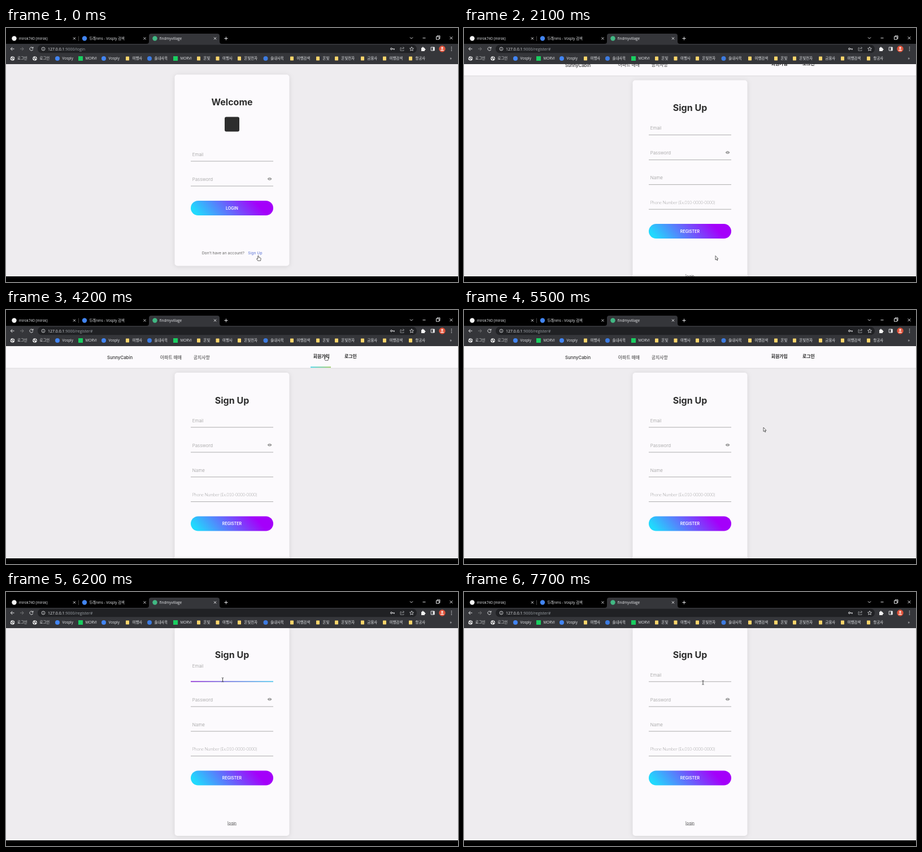
An HTML page that plays this animation: 800x450 px, repeating every 8000 ms.

```html
<!DOCTYPE html>
<html lang="ko">
<head>
<meta charset="utf-8">
<title>Sign Up</title>
<style>
html, body { margin: 0; width: 100%; height: 100%; overflow: hidden; background: #000; }
svg { display: block; }
text { font-family: Inter, "Noto Sans CJK KR", "Noto Sans CJK", sans-serif; white-space: pre; }
.ui { font-family: "Open Sans", "Noto Sans CJK KR", "Noto Sans CJK", sans-serif; }
.lato { font-family: Lato, sans-serif; }
.card { fill: #fcfafd; filter: drop-shadow(0 1px 4px rgba(0, 0, 0, .1)); }
.icon { fill: none; stroke: #e4e5e7; stroke-width: 1; }
</style>
</head>
<body>
<svg id="stage" width="800" height="450" viewBox="0 0 800 450">
  <defs>
    <clipPath id="view"><path d="M0 64H800V440H0Z"/></clipPath>
    <linearGradient id="pill" gradientUnits="userSpaceOnUse" x1="30" y1="45" x2="100" y2="-15">
      <stop stop-color="#21d9fd"/><stop offset="1" stop-color="#a400fa"/>
    </linearGradient>
    <linearGradient id="focus"><stop stop-color="#8a1fd8"/><stop offset="1" stop-color="#43c8f4"/></linearGradient>
    <linearGradient id="hover"><stop stop-color="#2fd0e4"/><stop offset="1" stop-color="#8cc34a"/></linearGradient>
  </defs>
  <g clip-path="url(#view)">
    <path d="M0 64H800V440H0Z" fill="#eeecef"/>
    <g id="login"></g>
    <g id="register"></g>
  </g>
  <g id="chrome"></g>
  <g id="cursor">
    <path id="arrow" d="M0 0V7.3L1.7 5.8 2.8 8.3 4 7.8 2.9 5.4H5Z" fill="#fff" stroke="#222" stroke-width=".7"/>
    <path id="hand" d="M-.8 .8Q0-.4.8.8V3.4L3.9 4.2Q4.8 4.6 4.6 6L4 9.3H-.9L-3 5.9Q-2.6 4.6-.8 6Z" fill="#fff" stroke="#222" stroke-width=".7"/>
    <path id="beam" d="M-1.7-3.5H-.5L0-3 .5-3.5H1.7M0-3V3M-1.7 3.5H-.5L0 3 .5 3.5H1.7" fill="none" stroke="#333" stroke-width=".9"/>
  </g>
</svg>
<script>
const $ = id => document.getElementById(id);
const text = (x, y, s, size, fill, more = '') =>
  `<text x="${x}" y="${y + size * .36}" font-size="${size}" fill="${fill}" ${more}>${s}</text>`;
const mid = 'text-anchor="middle" ';
const rect = (x, y, w, h, fill, r = 0) => `<rect x="${x}" y="${y}" width="${w}" height="${h}" rx="${r}" fill="${fill}"/>`;
const circle = (x, y, r, fill) => `<circle cx="${x}" cy="${y}" r="${r}" fill="${fill}"/>`;
const icon = (d, more = '') => `<path class="icon" d="${d}" ${more}/>`;

// Page content
const card = (y, h) => `<rect class="card" x="298.5" y="${y}" width="203" height="${h}" rx="5"/>`;
const title = (y, s) => text(400, y, s, 16, '#2d2d2d', mid + 'font-weight="700"');
const eye = y => `<path d="M462.8 ${y}Q466.6 ${y - 5} 470.4 ${y}Q466.6 ${y + 5} 462.8 ${y}Z" fill="#858585"/>` +
  circle(466.6, y, 1.7, '#fcfafd') + circle(466.6, y, 1, '#858585');
const field = (y, label, size = 8, more = '') =>
  text(329.7, y, label, size, '#999', 'font-weight="300" ' + more) + rect(327, y + 11.5, 146, 1, '#adadad');
const button = (y, label) => `<g transform="translate(327 ${y})">` + rect(0, 0, 146, 26, 'url(#pill)', 13) +
  text(73, 13, label, 7.1, '#fff', mid + 'font-weight="600"') + '</g>';

$('login').innerHTML = card(82.5, 339) + title(131, 'Welcome') + rect(387, 157.5, 26, 26, '#2d2d2d', 3) +
  field(224, 'Email') + field(268, 'Password') + eye(267.3) + button(306, 'LOGIN') +
  text(346.7, 398.5, 'Don’t have an account?', 6.8, '#666') +
  text(428.3, 398.5, 'Sign Up', 6.8, '#5b74d6');

const navItem = (x, s) => text(x, 82, s, 7.9, '#222', 'font-weight="700"');
$('register').innerHTML = rect(0, 102.5, 800, 1.5, '#e2e0e3') + rect(0, 64, 800, 38.5, '#fcfafd') +
  text(179, 84.5, 'SunnyCabin', 7.8, '#333', 'font-weight="500"') +
  text(272.7, 84, '아파트 매매', 7.9, '#333', 'font-weight="500"') +
  text(331.7, 84, '공지사항', 7.9, '#333', 'font-weight="500"') +
  navItem(543.8, '회원가입') + navItem(599, '로그인') +
  '<rect id="join" x="539" y="100.5" height="1.6" fill="url(#hover)"/>' +
  '<rect id="enter" x="594" y="100.5" height="1.6" fill="url(#hover)"/>' +
  card(111, 370) + title(160, 'Sign Up') +
  '<g id="email">' + text(329.7, 196, 'Email', 8, '#999', 'font-weight="300"') + '</g>' +
  rect(327, 207.3, 146, 1, '#adadad') + '<rect id="line" x="327" y="206.8" height="1.5" fill="url(#focus)"/>' +
  field(240, 'Password') + eye(239) + field(283.8, 'Name') +
  field(327.6, 'Phone Number (Ex.010-0000-0000)', 7.3, 'class="lato"') + button(365.5, 'REGISTER') +
  text(400, 458, 'login', 7, '#555', mid + 'text-decoration="underline"');

// Browser frame
const ui = (x, y, s, size = 6.4, fill = '#e8eaed', more = '') => text(x, y, s, size, fill, 'class="ui" ' + more);
const cross = (x, y, r) => icon(`M${x - r} ${y - r}L${x + r} ${y + r}M${x + r} ${y - r}L${x - r} ${y + r}`);
const marks = {
  globe: x => circle(x, 54, 3.8, '#f1f1f1') + `<path d="M${x - 3} 53L${x - 1} 54 ${x - .5} 57M${x + 1} 51L${x + .5} 53 ${x + 3} 54.5" fill="none" stroke="#35363a" stroke-width="1.1"/>`,
  search: x => circle(x, 54, 4, '#4285f4'),
  portal: x => rect(x - 4, 50, 8, 8, '#19ce60'),
  office: x => circle(x, 54, 4, '#3d7be0'),
  folder: x => rect(x - 3, 50.5, 6, 7, '#fbd56b', .7)
};
const bookmarks = [
  ['globe', 11.5, '로그인'], ['globe', 51, '로그인'], ['search', 91, 'Vosply'], ['portal', 132, 'MORVI'],
  ['search', 173, 'Vosply'], ['folder', 215, '여행사'], ['office', 254, '솔내사옥'], ['portal', 300, 'MORVI'],
  ['folder', 341, '온빛'], ['folder', 374.5, '여행사'], ['folder', 413, '온빛전자'], ['office', 459.5, '솔내사옥'],
  ['folder', 506, '여행검색'], ['folder', 552, '온빛'], ['folder', 585, '온빛전자'], ['folder', 631, '금융사'],
  ['folder', 670, '여행검색'], ['folder', 716, '항공사']
];
const tabs = [[10, 'mirok740 (mirok)', '#f5f5f5'], [134.5, '두레nms - Vosply 검색', '#4285f4'], [259, 'findmyvillage', '#41b883']];

$('chrome').innerHTML = rect(0, 0, 800, 28, '#000') + rect(0, 28, 800, 36, '#35363a') + rect(0, 440, 800, 10, '#000') +
  '<path d="M249 28Q253 28 253 24V14Q253 10 257 10H374Q378 10 378 14V24Q378 28 382 28Z" fill="#35363a"/>' +
  tabs.map(([x, s, c]) => circle(x + 4.5, 18.5, 4.2, c) + ui(x + 12.7, 18.5, s) + cross(x + 111, 18.5, 2)).join('') +
  icon('M128.5 14.5V23', 'style="stroke:#444"') + icon('M386.5 18.5H392.5M389.5 15.5V21.5') +
  icon('M715 16.5L717.5 19 720 16.5M737.5 17.8H742.5M761.5 15.3H766.5V20.3H761.5ZM763 15V13.8H768V18.8H767') + cross(788, 17.7, 2.4) +
  rect(56, 29.7, 671, 14.6, '#202124', 7.3) +
  icon('M14.5 37H8.5M11.3 34L8.3 37 11.3 40') +
  icon('M25 37H31M28.2 34L31.2 37 28.2 40', 'style="stroke:#77787b"') +
  icon('M47 34.8A3 3 0 1 0 47.8 38M48 33.5V36H45.5') +
  icon('M69 37A3 3 0 1 1 63 37A3 3 0 1 1 69 37M66 36.6V38.8M66 35V35.8', 'style="stroke-width:.8"') +
  ui(74, 37, '127.0.0.1<tspan id="path" fill="#9aa0a6"></tspan>', 7) +
  icon('M683.6 37A1.5 1.5 0 1 1 680.6 37A1.5 1.5 0 1 1 683.6 37H688M686.8 37V39') +
  icon('M700 35H698V40.2H704V38.5M699.8 38Q700.3 35.3 704.5 35.3M702.5 33.3L704.7 35.3 702.5 37.2', 'style="stroke:#a5a7aa;stroke-width:.8"') +
  icon('M718 33.5L719 35.9 721.5 36.1 719.6 37.8 720.2 40.3 718 39 715.8 40.3 716.4 37.8 714.5 36.1 717 35.9Z', 'style="stroke-width:.8"') +
  rect(735, 35, 6, 6, '#f1f1f1', .6) + circle(737.8, 34.8, 1.3, '#f1f1f1') + circle(741.2, 38, 1.3, '#f1f1f1') +
  icon('M752.2 34H758.2V40H752.2Z') + rect(755.5, 34, 3, 6, '#e4e5e7') +
  circle(772, 37, 5.7, '#e0523a') + circle(772, 35.4, 1.8, '#fbe4dd') + '<path d="M768.4 40.2Q772 35.6 775.6 40.2Z" fill="#fbe4dd"/>' +
  [34, 37, 40].map(y => circle(788.5, y, .8, '#e4e5e7')).join('') +
  bookmarks.map(([kind, x, s]) => marks[kind](x) + ui(x + 8.6, 54, s, 6.4)).join('') + ui(785.5, 53.5, '»', 7);

// Motion
const pointer = [
  [0, 446.5, 403], [1990, 446.5, 403], [2000, 445, 403.5], [2200, 445, 403.5], [2800, 577, 102], [3100, 640, 88],
  [3500, 610, 80], [3800, 610, 80], [4100, 566, 80], [4500, 566, 80], [4700, 604, 92], [5100, 565, 150],
  [5500, 530, 208], [5800, 383.5, 155.5], [6500, 383.5, 155.5], [7000, 538, 200], [7300, 538, 200],
  [7700, 423, 160.5], [8000, 423, 160.5]
];
const scroll = [[0, 39], [2000, 39], [2100, 18.4], [2200, 5], [2300, 0], [5550, 0], [5700, 36], [5800, 49], [8000, 49]];
const ease = u => u * u * (3 - 2 * u);
const ramp = (t, a, b) => ease(Math.min(1, Math.max(0, (t - a) / (b - a))));
const at = (keys, t) => {
  const i = Math.max(1, keys.findIndex(k => k[0] > t)), a = keys[i - 1], b = keys[i];
  const u = ease((t - a[0]) / (b[0] - a[0]));
  return a.slice(1).map((v, j) => v + (b[j + 1] - v) * u);
};
const show = (id, on) => $(id).setAttribute('display', on ? 'inline' : 'none');

function draw(now) {
  const t = Math.floor(now % 8000 / 100) * 100;
  const signup = t >= 2000, [x, y] = at(pointer, t);
  show('login', !signup);
  show('register', signup);
  $('path').textContent = signup ? ':9000/register#' : ':9000/login';
  $('register').setAttribute('transform', `translate(0 ${-at(scroll, t)[0]})`);

  const focus = ramp(t, 5800, 6100) - ramp(t, 7000, 7300);
  $('email').setAttribute('transform', `translate(0 ${-16 * focus})`);
  $('line').setAttribute('width', 146 * focus);
  $('join').setAttribute('width', 36 * (ramp(t, 3900, 4200) - ramp(t, 4500, 4800)));
  $('enter').setAttribute('width', 32 * (ramp(t, 3200, 3500) - ramp(t, 3800, 4100)));

  const onNav = y < 95 && (x > 539 && x < 575 || x > 594 && x < 626);
  const hand = !signup || onNav, beam = t > 5600 && x > 327 && x < 473;
  show('hand', hand);
  show('beam', beam);
  show('arrow', !hand && !beam);
  $('cursor').setAttribute('transform', `translate(${x} ${y})`);
}

const start = performance.now();
(function tick() {
  draw(performance.now() - start);
  requestAnimationFrame(tick);
})();
</script>
</body>
</html>
```
